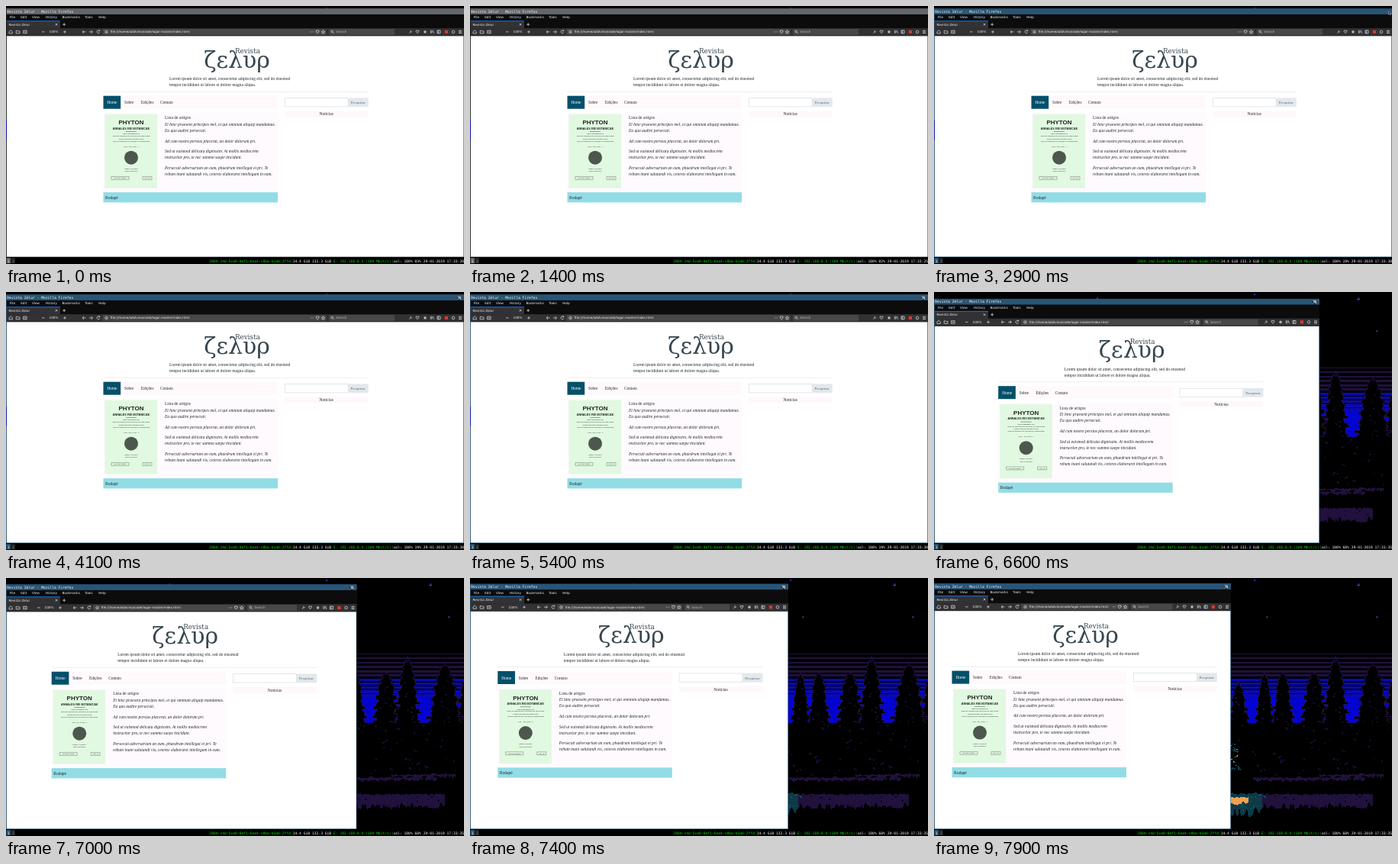
These frames come from a looping animation (600x338 px, 8000 ms). An HTML page:

```html
<!DOCTYPE html>
<html lang="pt">
<head>
<meta charset="utf-8">
<title>Window resize</title>
<style>
html, body { margin: 0; width: 100%; height: 100%; overflow: hidden; background: #000; }
svg { display: block; width: 100vw; height: 100vh; }
.ui { font: 4.2px "DejaVu Sans", sans-serif; fill: #f0f0f2; }
.mono { font: 4.67px "DejaVu Sans Mono", monospace; fill: #fff; }
.page { font: 5.5px "Liberation Serif", serif; fill: #22282c; }
.brand { font-family: "DejaVu Serif", serif; fill: #37474f; }
.cover { font-family: "Liberation Sans", sans-serif; fill: #1c241c; text-anchor: middle; }
.icon { fill: none; stroke: #d2d2d4; stroke-width: .8; }
</style>
</head>
<body>
<svg id="stage" viewBox="0 0 600 338" preserveAspectRatio="none"></svg>
<script>
const LOOP = 8000, STEP = 100, BOTTOM = 329;
const NAME = 'Revista Zelur';
const BLUE = '#285577', GREY = '#62676b', PURPLE = '#20113d', GREEN = '#00e000';

let seed = 11;
const rnd = () => (seed = (seed * 16807) % 2147483647) / 2147483647;
const between = (a, b) => a + (b - a) * rnd();
const times = (n, fn) => Array.from({ length: n }, (_, i) => fn(i)).join('');

const rect = (x, y, w, h, fill, extra = '') =>
  `<rect x="${x}" y="${y}" width="${w}" height="${h}" fill="${fill}" ${extra}/>`;
const text = (x, y, s, extra = '') => `<text x="${x}" y="${y}" ${extra}>${s}</text>`;
const line = (d, extra = '') => `<path d="${d}" ${extra}/>`;
const group = (body, extra = '') => `<g ${extra}>${body}</g>`;

// Night forest behind the window
function sky() {
  const dusk = times(6, i => rect(0, 99 + i * 5.4, 600, 0.9 + i * 0.5, PURPLE));
  const blue = times(5, i => rect(0, 132 + i * 5, 600, 2.6 + i * 0.4, '#0a08b8'));
  const glow = rect(0, 156, 600, 36, '#0404d0');
  const stars = [[556, 9, 1.6], [436, 51, 1], [580, 51, 1], [214, 8, .8], [420, 3, .6]]
    .map(([x, y, r]) => line(`M${x - r} ${y}h${2 * r}M${x} ${y - r}v${2 * r}`, 'stroke="#4a3ac8" stroke-width="1"'))
    .join('');
  return dusk + blue + glow + stars;
}

// Spire whose tiers widen down to the ground
function tree(x, top, width) {
  let left = '', right = '', marks = '';
  for (let y = top; y < 194; y += 3) {
    const tier = 0.7 + 0.3 * (((y - top) % 12) / 12);
    const w = 1 + width * Math.sqrt((y - top) / (194 - top)) * tier * between(.85, 1.15);
    left += `L${(x - w).toFixed(1)} ${y}v2`;
    right = `L${(x + w).toFixed(1)} ${y + 2}v-2` + right;
    if (rnd() < .35) marks += `M${(x + between(-w, w * .6)).toFixed(1)} ${y}l${between(1, 3).toFixed(1)} 2`;
  }
  return line(`M${x} ${top - 3}${left}L${x} 200${right}Z`, `fill="#000" stroke="${PURPLE}" stroke-width="1"`) +
    line(marks, `fill="none" stroke="${PURPLE}" stroke-width="1"`);
}

function leaves(n, x0, x1, y0, y1, size, color) {
  const d = times(n, () => {
    const w = between(-size, size);
    return `M${between(x0, x1).toFixed(1)} ${between(y0, y1).toFixed(1)}l${w.toFixed(1)} ${(Math.abs(w) * .7).toFixed(1)}`;
  });
  return line(d, `stroke="${color}" stroke-width="1.3" fill="none"`);
}

// Strip with uneven top and bottom edges
function ragged(x0, x1, top, bottom, rough, color) {
  let upper = '', lower = '';
  for (let x = x0; x <= x1; x += 2) {
    upper += `L${x} ${(top + between(-1, 2)).toFixed(1)}`;
    lower = `L${x} ${(bottom - between(0, rough)).toFixed(1)}` + lower;
  }
  return line('M' + upper.slice(1) + lower + 'Z', `fill="${color}"`);
}

function forest() {
  const trees = [[399, 138, 14], [457, 124, 15], [498, 124, 20], [604, 128, 15],
    [433, 126, 13], [526, 106, 18], [575, 113, 24]].map(p => tree(...p)).join('');
  return sky() + trees + rect(0, 190, 600, 139, '#000') +
    leaves(26, 384, 600, 186, 200, 3, PURPLE) +
    leaves(34, 480, 590, 200, 256, 4, PURPLE) + leaves(16, 400, 480, 225, 258, 4, PURPLE) +
    ragged(418, 565, 261, 267, 4, PURPLE) + ragged(505, 590, 257, 263, 5, PURPLE) +
    ragged(413, 576, 283, 304, 10, PURPLE) + leaves(18, 430, 590, 282, 302, 3, '#000') +
    leaves(26, 386, 400, 209, 254, 4, '#12505c') + leaves(7, 388, 399, 214, 250, 2, '#e0944c') +
    ragged(380, 430, 282, 314, 14, '#0d3a46') + leaves(30, 382, 432, 282, 304, 3, '#14586a') +
    ragged(380, 413, 287, 298, 5, '#f0a052');
}

// Web page inside the browser
function cover() {
  const small = (y, s, size = 1.9) => text(164, y, s, `font-size="${size}"`);
  return rect(129.5, 142, 68.5, 97, '#e1f8e1') + group(
    text(164, 155.6, 'PHYTON', 'font-size="8" font-weight="bold"') +
    text(164, 162, 'ANNALES REI BOTANICAE', 'font-size="3.75" font-weight="bold"') +
    rect(157, 164.6, 14, .5, '#444') +
    small(168.5, 'HERAUSGEGEBEN VON') +
    small(171.4, 'PROF. DR. DER BOTANIK UND PROF. DR. DER KUNDE') +
    small(175.2, 'SCHRIFTLEITUNG UND REDAKTION') +
    small(178.1, 'INSTITUT DER BOTANIK UND DER PFLANZENKUNDE') +
    small(185, 'VOL. 49, FASC. 1', 2.5) +
    '<circle cx="164" cy="199" r="9" fill="#4d574d"/>' +
    small(214.2, 'HORN, AUSTRIA', 2.3) + small(217.5, 'VERLAG UND DRUCK', 1.6) +
    line('M138 223.8h23v4h-23zM179 223.8h12v4h-12z', 'fill="none" stroke="#6d776d" stroke-width=".5"') +
    text(149.5, 226.6, 'PHYTON (HORN)', 'font-size="2"') + text(185, 226.6, 'VOL. 49', 'font-size="2"'),
    'class="cover"');
}

function page() {
  const paragraphs = [
    [157.3, 'Ei hinc praesent principes mel, ei qui omnium aliquip mandamus.'],
    [165.3, 'Ea quo audire persecuti.'],
    [178.9, 'Ad cum nostro persius placerat, an dolor dolorum pri.'],
    [192.7, 'Sed ut euismod delicata dignissim. At mollis mediocrem'],
    [200.7, 'instructior pro, te nec summo saepe tincidunt.'],
    [214.3, 'Persecuti adversarium an eum, phaedrum intellegat ei pri. Te'],
    [222.3, 'rebum inani salutandi vis, ceteros elaboraret intellegam in eam.']
  ].map(([y, s]) => text(208, y, s)).join('');
  const nav = [[155, 'Sobre'], [176.7, 'Edições'], [202, 'Contato']].map(([x, s]) => text(x, 128.7, s)).join('');
  return text(302.5, 81.2, 'ζελυρ', 'class="brand" font-size="30" text-anchor="middle"') +
    text(300, 62.6, 'Revista', 'class="brand" font-size="8.8"') +
    text(214, 97.5, 'Lorem ipsum dolor sit amet, consectetur adipiscing elit, sed do eiusmod') +
    text(214, 105.6, 'tempor incididunt ut labore et dolore magna aliqua.') +
    rect(127.5, 112.3, 347, .6, '#e4e4e6') +
    rect(127.5, 118, 228.5, 17, '#fff9fc') + rect(127.5, 118, 22.7, 17, '#04506a') +
    group(text(132.5, 128.7, 'Home', 'fill="#fff"') + nav, 'font-size="5.3"') +
    rect(127.5, 140, 228.5, 104.5, '#fffafd') + cover() +
    text(208, 148.7, 'Lista de artigos') + group(paragraphs, 'font-style="italic"') +
    rect(127.5, 244.4, 228.5, 13.3, '#92dce6') + text(130, 253, 'Rodapé') +
    rect(365.2, 121, 83, 11.2, '#fff', 'stroke="#cfd5d9" stroke-width=".6"') +
    rect(448, 120.7, 26.7, 11.8, '#e2e8eb') + text(451.5, 128.6, 'Pesquisar', 'font-size="5" fill="#5f6c74"') +
    rect(365, 137.8, 109.7, 8.2, '#fff8fb') + text(419.7, 143.8, 'Notícias', 'text-anchor="middle"');
}

// Browser chrome; parts that follow the width have ids
function chrome() {
  const menu = [[5, 'File'], [19.2, 'Edit'], [34, 'View'], [52, 'History'], [73.5, 'Bookmarks'], [103.3, 'Tools'], [121.2, 'Help']]
    .map(([x, s]) => text(x, 17.2, s)).join('');
  const tools =
    line('M-71.5 36.5l2.5-2.5M-69.5 32.5a1.2 1.2 0 1 0 1.6 1.6' +
      'M-62.8 33h3.6v1.5l-1.8 2l-1.8-2z' +
      'M-51 32.6v4.2M-53 34.7h4M-52.3 33.3l2.6 2.8M-49.7 33.3l-2.6 2.8' +
      'M-43.7 32.6v4M-42.2 32.6v4M-40.9 32.6l1.3 4' +
      'M-35 32.8h4v3.8h-4zM-33.6 32.8v3.8' +
      'M-7 33.1h4M-7 34.7h4M-7 36.3h4', 'class="icon"') +
    rect(-25.2, 32.6, 4.2, 4.2, '#e0362c') + '<circle cx="-14" cy="34.7" r="1.8" class="icon"/>';
  const body = rect(.7, 11.6, 600, 19.4, '#0c0c0d') + menu +
    rect(.7, 20.3, 70.3, 10, '#323234') + rect(.7, 20.2, 70.3, .8, '#0a84ff') +
    text(3.5, 26.6, NAME) +
    line('M64.8 23.7l2.6 2.6M67.4 23.7l-2.6 2.6M74.2 25h4M76.2 23v4', 'class="icon"') +
    rect(.7, 30, 600, 10, '#323234') + rect(.7, 39.5, 600, .5, '#1a1a1c') +
    line('M4 34.5l2.2-2l2.2 2v2.2h-4.4zM13.2 33.2h2l.6.6h2.2v2.8h-4.8zM22.6 33h4.6v3.6h-4.6zM24 34.8h2', 'class="icon"') +
    group(line('M47 34.7h3.6M75.2 34.7h3.6M77 32.9v3.6', 'class="icon"') + text(56.5, 36.2, '100%'), 'id="zoom"') +
    rect(0, 30.8, 0, 8, '#474749', 'id="urlBox" rx="1"') + rect(0, 30.8, 0, 8, '#474749', 'id="findBox" rx="1"') +
    group(
      line('M104.5 34.7h-4.4M102 32.8l-2 1.9l2 1.9M109 34.7h4.4M111.5 32.8l2 1.9l-2 1.9M122.5 33.2a2 2 0 1 0 .4 2M122.8 32v1.6h-1.6', 'class="icon"') +
      '<circle cx="131.5" cy="34.7" r="1.7" class="icon"/>' + rect(131.2, 34.3, .6, 1.4, '#d2d2d4') +
      text(136.8, 36.2, 'file:///home/adalvino/code/logoi-master/index.html', 'font-size="4.1"'), 'id="address"') +
    group(line('M-20.8 34.7h.8M-19.1 34.7h.8M-17.4 34.7h.8M-13.2 32.9h3.6v1.9l-1.8 1.9l-1.8-1.9z' +
      'M-4 32.5l.7 1.5l1.6.2l-1.2 1.1l.3 1.5l-1.4-.8l-1.4.8l.3-1.5l-1.2-1.1l1.6-.2z', 'class="icon"'), 'id="urlIcons"') +
    group('<circle cx="4.2" cy="34.2" r="1.3" class="icon"/>' + line('M5.2 35.2l1.3 1.4', 'class="icon"') +
      text(9, 36.2, 'Search', 'fill="#b4b4b6"'), 'id="findText"') +
    group(tools, 'id="tools"');
  return group(body, 'transform="translate(0 -.8)"') +
    rect(0, 3.2, 600, 7.6, BLUE, 'id="title"') + text(1.3, 8.7, NAME + ' - Mozilla Firefox', 'class="mono"');
}

function statusBar() {
  const part = (s, fill, id = '') => `<tspan fill="${fill}" ${id && `id="${id}"`}>${s}</tspan>`;
  return rect(0, BOTTOM, 600, 9, '#000') +
    rect(.4, 330, 5.8, 7.2, BLUE, 'id="space"') + rect(6.8, 330, 5.2, 7.2, '#222') +
    text(1.9, 335.7, '1', 'class="mono"') + text(8, 335.7, '2', 'class="mono" style="fill:#888"') +
    text(600, 335.7,
      part('2804:14d:5ce8:9ef1:6ea4:c8ba:b1a0:2ffd', GREEN) + part('|', '#777') +
      part('14.4 GiB 132.3 GiB ', '#fff') + part('E: 192.168.0.4 (100 Mbit/s)', GREEN) +
      part('|', '#777') + part('', '#fff', 'clock'), 'class="mono" text-anchor="end"');
}

const stage = document.getElementById('stage');
stage.innerHTML =
  '<defs><clipPath id="clip"><rect id="clipBox" x="0" y="0" width="600" height="329"/></clipPath></defs>' +
  rect(0, 0, 600, 338, '#000') + group(forest(), 'shape-rendering="crispEdges"') +
  group(
    rect(0, 3.2, 600, 326, BLUE, 'id="frame"') + rect(.7, 39, 600, 289, '#fff', 'id="paper"') +
    group(page(), 'id="page" class="page"') + group(chrome(), 'id="chrome" class="ui"') +
    rect(0, 0, .7, 330, BLUE, 'id="edge"'), 'clip-path="url(#clip)"') +
  rect(0, 150, .8, 25, '#0404d0', 'id="gap"') + statusBar() +
  group(line('M0 0v4.2l1.1-1l.8 1.6l.8-.4l-.8-1.5h1.4z', 'fill="#111" stroke="#fff" stroke-width=".4"'), 'id="arrow"') +
  group(rect(-2.5, -2.5, 5, 5, '#16222c') + line('M-2 -2h4v4M-2 2l2.8-2.8M-1.2 -.8h2v2', 'fill="none" stroke="#e8eef2" stroke-width=".8"'), 'id="grip"');

const el = {};
stage.querySelectorAll('[id]').forEach(node => { el[node.id] = node; });
const set = (id, attrs) => { for (const k in attrs) el[id].setAttribute(k, attrs[k]); };
const move = (id, x, y) => set(id, { transform: `translate(${x} ${y})` });

// Smooth curve through [time, value] pairs, flat at both ends
function curve(keys, t) {
  const last = keys.length - 1;
  if (t <= keys[0][0]) return keys[0][1];
  if (t >= keys[last][0]) return keys[last][1];
  const slope = i => i === 0 || i === last ? 0
    : (keys[i + 1][1] - keys[i - 1][1]) / (keys[i + 1][0] - keys[i - 1][0]);
  const i = keys.findIndex(k => k[0] > t) - 1;
  const [t0, a] = keys[i], [t1, b] = keys[i + 1];
  const d = t1 - t0, u = (t - t0) / d;
  return a + (b - a) * u * u * (3 - 2 * u) + d * u * (1 - u) * ((1 - u) * slope(i) - u * slope(i + 1));
}

const track = values => [5400, 5900, 6600, 7400, 7900].map((t, i) => [t, values[i]]);
const RIGHT = track([600, 573, 505, 417, 389]);
const DROP = track([0, 4.5, 5.5, 4.3, 3.9]);
const SHIFT = track([0, -13.2, -43.3, -91.2, -104]);
const CLOCK = [[6200, '68%', 35], [2200, '19%', 30], [500, '02%', 25], [0, '03%', 20]];

function draw(t) {
  const right = curve(RIGHT, t), drop = curve(DROP, t), cut = 600 - right;
  const focused = t >= 2200, gripping = t >= 3800;
  const color = focused ? BLUE : GREY;

  set('clipBox', { width: right, y: 3.2 + drop });
  set('frame', { width: right, y: 3.2 + drop, height: 325.8 - drop, fill: color });
  set('paper', { width: right - 1.4, y: 39 + drop, height: 289.4 - drop });
  set('title', { fill: color });
  set('space', { fill: color });
  set('edge', { fill: focused ? BLUE : '#0a0a0c', y: 3.2 + drop });
  set('gap', { visibility: cut ? 'hidden' : 'visible' });
  move('chrome', 0, drop);
  move('page', curve(SHIFT, t), drop - .3);

  const lead = Math.min(12, cut * .24);
  const findRight = right - 91 + 16 * (1 - Math.exp(-cut / 90));
  const findLeft = findRight - 86 + cut * .15;
  const urlRight = findLeft - 3.5;
  move('zoom', -Math.min(6, cut * .1), 0);
  move('address', -lead, 0);
  move('urlIcons', urlRight, 0);
  move('findText', findLeft, 0);
  move('tools', right, 0);
  set('urlBox', { x: 126.5 - lead, width: urlRight - 126.5 + lead });
  set('findBox', { x: findLeft, width: findRight - findLeft });

  const [, load, sec] = CLOCK.find(c => t >= c[0]);
  el.clock.textContent = `vol: 100% ${load} 29-01-2019 17:33:${sec}`;

  const enter = Math.min(1, Math.max(0, (t - 2200) / 700));
  const far = (1 - enter) ** 2;
  move('arrow', 595.5 + 4 * far, 7 + 52 * far);
  move('grip', right - 6.6, 8 + drop);
  set('arrow', { visibility: focused && !gripping ? 'visible' : 'hidden' });
  set('grip', { visibility: gripping ? 'visible' : 'hidden' });
}

function tick() {
  draw(Math.floor((performance.now() % LOOP) / STEP) * STEP);
  requestAnimationFrame(tick);
}
tick();
</script>
</body>
</html>
```
